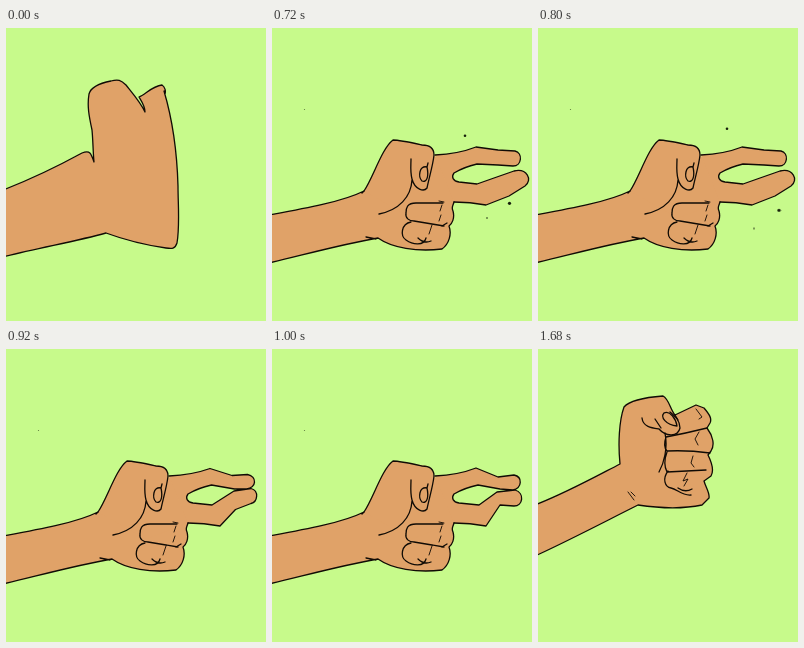
Write an HTML page that moves like this. It is 260x293 px and loops after 1.76 s.

```html
<!DOCTYPE html>
<html lang="en">
<head>
<meta charset="utf-8">
<title>Hand game</title>
<style>
html, body { margin: 0; height: 100%; overflow: hidden; background: #c7fa8b; }
svg { display: block; width: 100vw; height: 100vh; }
path { fill: none; stroke: #100b05; stroke-width: 1.3; stroke-linecap: round; stroke-linejoin: round; }
.skin { fill: #e0a268; }
.flat { stroke: none; }
.thin { stroke-width: .9; }
.speck { fill: #17200c; }

.paper, .side, .scissors, .fist, .raised, .spark, .marks, #fingers { animation: 1760ms step-end infinite; }
.paper { animation-name: paper; }
.side { animation-name: side; }
.scissors { animation-name: scissors; }
.fist { animation-name: fist; }
.raised { animation-name: raised; }
.spark { animation-name: spark; }
.marks { animation-name: marks; }
#fingers { animation-name: pinch; }

@keyframes paper { 0% { opacity: 1 } 2.272%, 100% { opacity: 0 } }
@keyframes side { 0% { opacity: 0 } 2.272% { opacity: 1 } 95.454%, 100% { opacity: 0 } }
@keyframes scissors { 0% { opacity: 1 } 90.909%, 100% { opacity: 0 } }
@keyframes fist { 0% { opacity: 0 } 90.909%, 100% { opacity: 1 } }
@keyframes raised { 0% { opacity: 0 } 95.454%, 100% { opacity: 1 } }
@keyframes marks { 0% { opacity: 1 } 40.909%, 100% { opacity: 0 } }

/* specks fly off while the fingers snap together */
@keyframes spark {
  0% { opacity: 0; transform: none }
  40.909% { opacity: 1; transform: none }
  43.181% { opacity: 1; transform: none; animation-timing-function: steps(2, end) }
  47.727% { opacity: 1; transform: translate(var(--dx), var(--dy)) }
  50%, 100% { opacity: 0; transform: none }
}

@keyframes pinch {
  0% { d: path("M163 127C180 126 190 124 200 120L231 109C243 105 250 116 242 122C224 130 200 138 184 145C179 148 181 153 187 154C210 158 235 157 246 156L264 157L264 174C240 178 210 174 182 174") }
  40.909%, 43.181% {
    d: path("M163 127Q186 126 204 119L226 122L243 123C251 125 250 138 241 138L226 137L205 136Q192 139 182 145C179 149 181 153 187 154L205 156L222 150L242 143C255 140 261 152 253 158L237 168L214 177Q198 174 182 174");
  }
  43.181% { animation-timing-function: steps(2, end) }
  47.727% {
    d: path("M163 127Q186 126 204 120L226 125L241 125C252 127 251 139 240 139L229 140L205 136Q192 139 182 145C179 149 181 153 187 154L205 156L231 141L247 138C254 140 252 149 248 152L231 165L214 177Q198 174 182 174");
    animation-timing-function: steps(4, end);
  }
  56.818%, 100% {
    d: path("M163 127Q186 126 204 119L226 128L242 126C251 128 250 139 241 141L228 140L206 136Q192 139 182 145C179 149 181 153 187 154L207 156L225 143L243 141C253 144 251 157 242 157L228 156L214 177Q198 174 182 174");
  }
}
</style>
</head>
<body>
<svg viewBox="0 0 260 293" preserveAspectRatio="none">
  <g class="paper">
    <path class="skin" d="M-3 162C28 150 54 137 76 125C84 122 85 125 88 134C87 124 87 112 86 102C83 88 81 78 83 66C85 58 95 55 105 53C112 51 115 52 120 57C128 67 135 75 139 84C139 78 136 74 133 69C139 67 146 58 156 57C159 59 160 63 159 66L158 63C166 90 171 122 172 158C172 176 174 198 171 215C169 221 166 221 160 220C139 217 119 212 100 205C68 214 30 220 -3 229"/>
  </g>

  <g class="side">
    <path class="skin flat" d="M-3 187C30 181 70 174 92 163L140 145L182 174C181 178 179 179 181 183C183 190 180 196 177 198C180 206 177 216 170 221C145 224 120 220 106 210C71 216 35 226 -3 235Z"/>

    <g class="scissors">
      <path class="skin flat" d="M92 163C101 150 110 120 121 112L155 117Q162 119 162 127L181 148L182 174L140 190Z"/>
      <path id="fingers" class="skin" d="M163 127L182 174"/>
      <path d="M92 163C101 150 110 120 121 112C128 112 141 115 150 117C159 117 162 121 162 127C161 137 157 150 155 160C152 164 143 162 140 151C138 143 139 137 139 131M140 152C139 169 127 182 107 186"/>
      <path d="M155 139C147 137 146 149 150 153C155 155 157 148 155 139M156 135L155 139"/>
      <path d="M171 175L144 175C135 175 134 180 134 185C133 190 137 193 142 193L172 198"/>
      <path class="thin" d="M170 177L168 183M169 187L167 193M160 197L157 206M167 173L172 174"/>
      <path class="thin marks" stroke-dasharray="3 2" d="M222 125L227 127M235 170L238 171"/>
    </g>

    <g class="fist">
      <path class="skin" d="M155 130L180 129C186 129 184 140 183 150C187 158 187 167 182 174L140 190"/>
      <path class="skin flat" d="M92 163C99 148 102 116 109 108C120 106 140 107 151 107Q157 109 156 118L156 150L180 152L181 175L140 196Z"/>
      <path d="M92 163C99 148 102 116 109 108C120 106 140 107 151 107Q157 109 156 118L156 147C155 153 148 152 143 149C136 142 134 133 134 123"/>
      <path d="M146 129C144 136 146 144 153 146C155 138 154 125 146 129"/>
      <path d="M140 145C136 150 138 152 143 153Q165 151 183 150M138 151C138 164 132 178 119 186M138 154C136 161 135 167 140 171Q160 173 182 174M138 171C133 178 132 187 139 192L176 195"/>
      <path class="thin" d="M178 151L175 157L177 159M169 175L167 182M169 186L167 190M160 197L157 206"/>
    </g>

    <path d="M-3 187C30 181 70 174 92 163L90 165M182 174C181 178 179 179 181 183C183 190 180 196 177 198C180 206 177 216 170 221C145 224 120 220 106 210C71 216 35 226 -3 235M94 209L104 211"/>
    <path d="M139 194C129 196 128 208 134 212C141 217 152 218 154 210M146 210Q152 216 159 213M170 198L175 195"/>
    <circle class="speck" cx="32.5" cy="81.5" r=".6" opacity=".6"/>
  </g>

  <g>
    <circle class="speck spark" cx="193" cy="107.7" r="1.3" style="--dx:-8px;--dy:-14px"/>
    <circle class="speck spark" cx="237.5" cy="175.3" r="1.6" style="--dx:7px;--dy:14px"/>
    <circle class="speck spark" cx="215" cy="190" r=".8" style="--dx:2px;--dy:21px"/>
  </g>

  <g class="raised">
    <path class="skin" d="M-3 156C28 144 55 129 82 115C80 95 81 72 86 58C93 50 112 48 125 47C131 50 132 60 137 66L158 56L166 59C172 66 174 70 172 74L169 79C175 87 177 96 173 102L170 106C174 114 176 122 173 127L166 132C168 139 172 144 171 149L164 156C145 160 120 159 100 156C66 173 32 191 -3 207"/>
    <path d="M104 69C105 78 114 79 121 80C128 88 140 88 142 79C142 72 138 68 132 63M117 70L123 79"/>
    <path d="M126 64C122 68 128 76 139 77C138 70 132 61 126 64"/>
    <path d="M137 66L140 71M127 84C130 99 126 114 121 123M128 88Q149 84 169 79M128 88C126 94 126 99 129 102Q150 101 172 104M129 103C126 111 126 117 129 123L168 121M130 122C124 130 127 138 133 139C139 140 144 147 153 146M140 139Q147 144 154 140"/>
    <path class="thin" d="M158 60L164 68L161 70M161 83L157 90L160 96M155 107L153 114L156 118M149 124L145 132L150 130L146 137M90 143L96 151M93 143L97 147"/>
  </g>
</svg>
</body>
</html>
```
